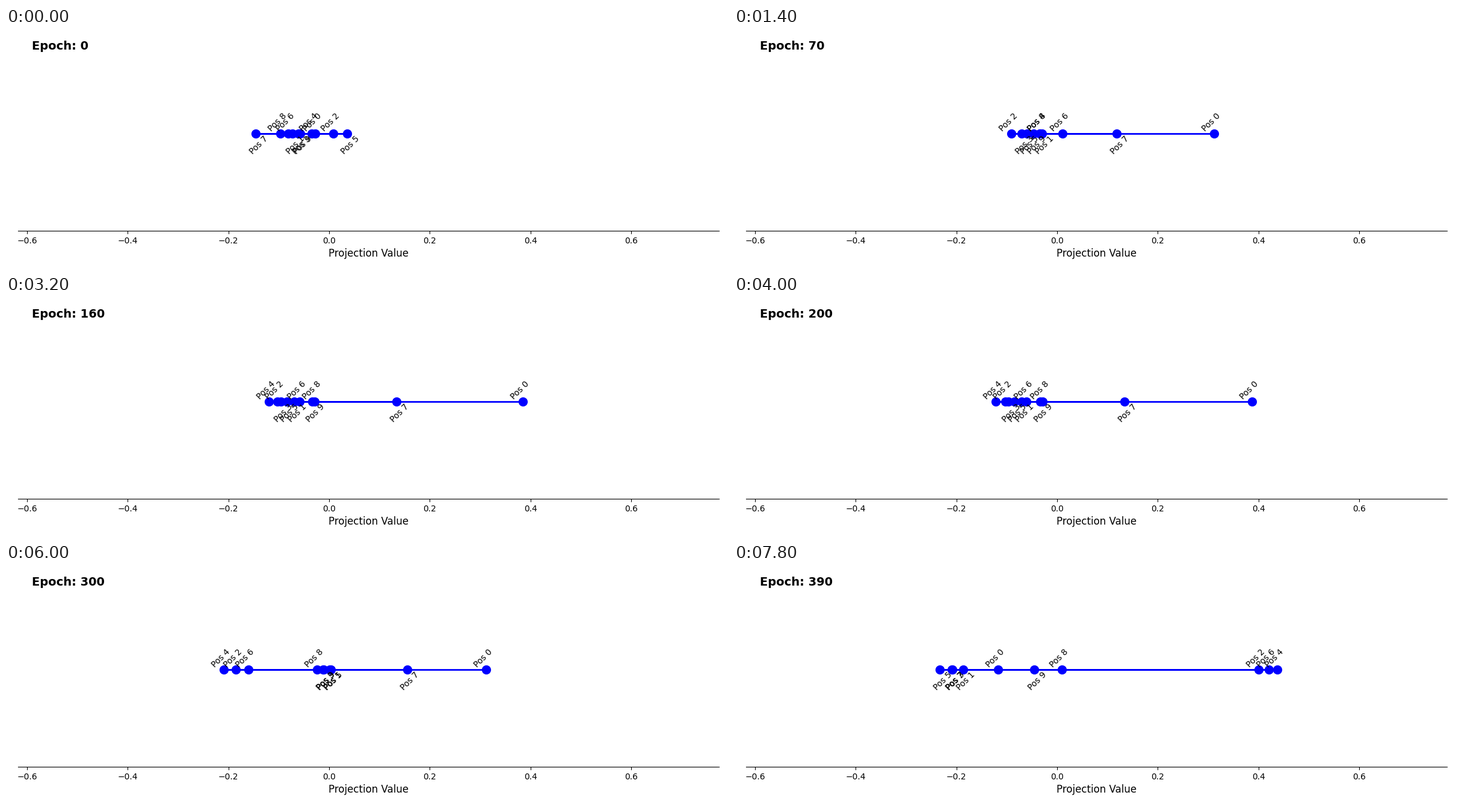
A matplotlib script that plays this animation: 1200x400 px, repeating every 8 s.

```python
import numpy as np
import matplotlib.pyplot as plt
from matplotlib.animation import FuncAnimation

W, H, DPI = 1200, 400, 100
FRAMES, INTERVAL = 40, 200
EPOCHS_PER_FRAME = 10

# Poses of positions 0 to 9 along the projection axis, in thousandths
START = np.array([27, 73, -8, 61, 35, -36, 81, 146, 97, 58])
SPREAD = np.array([247, 4, -80, -48, 42, -39, 72, 104, -40, -59])
SETTLED = np.array([387, -70, -103, -97, -122, -85, -61, 134, -29, -33])
END = np.array([117, 187, -400, 208, -438, 233, -421, 209, -10, 45])

# Frames at which the poses are reached
SPREAD_AT, SETTLED_AT, END_AT = 4, 20, FRAMES - 1

# The axis shows the projection mirrored outside these frames
FLIP_END, FLIP_START = 5, 33


def blend(a, b, t):
    return a + (b - a) * t


def positions(frame):
    """Spread evenly, ease out into the plateau, then drift off faster and faster."""
    if frame < SPREAD_AT:
        pose = blend(START, SPREAD, frame / SPREAD_AT)
    elif frame < SETTLED_AT:
        t = (frame - SPREAD_AT) / (SETTLED_AT - SPREAD_AT)
        pose = blend(SPREAD, SETTLED, 1 - (1 - t) ** 3)
    else:
        t = (frame - SETTLED_AT) / (END_AT - SETTLED_AT)
        pose = blend(SETTLED, END, t ** 2)
    sign = 1 if FLIP_END <= frame < FLIP_START else -1
    return sign * pose / 1000


fig = plt.figure(figsize=(W / DPI, H / DPI), dpi=DPI, facecolor="white")
ax = fig.add_axes([20 / W, 62.2 / H, 1165 / W, 322.8 / H])
ax.set_xlim(-0.618, 0.7745)
ax.set_ylim(-1, 1)
ax.set_yticks([])
ax.set_xlabel("Projection Value", fontsize=12)
for side in ("left", "right", "top"):
    ax.spines[side].set_visible(False)

line, = ax.plot([], [], "o-", color="blue", markersize=10, linewidth=2)
epoch = ax.text(0.02, 0.98, "", transform=ax.transAxes, fontsize=14,
                fontweight="bold", va="top")
labels = []
for p in range(len(START)):
    above = p % 2 == 0
    labels.append(ax.annotate(
        f"Pos {p}", (0, 0), xytext=(0, 10 if above else -10),
        textcoords="offset points", ha="center",
        va="bottom" if above else "top",
        rotation=45, rotation_mode="anchor", fontsize=10))


def update(frame):
    xs = positions(frame)
    line.set_data(xs, np.zeros(len(xs)))
    for label, x in zip(labels, xs):
        label.xy = (x, 0)
    epoch.set_text(f"Epoch: {frame * EPOCHS_PER_FRAME}")
    return [line, epoch, *labels]


anim = FuncAnimation(fig, update, frames=FRAMES, interval=INTERVAL,
                     repeat=True, repeat_delay=0)
plt.show()
```
